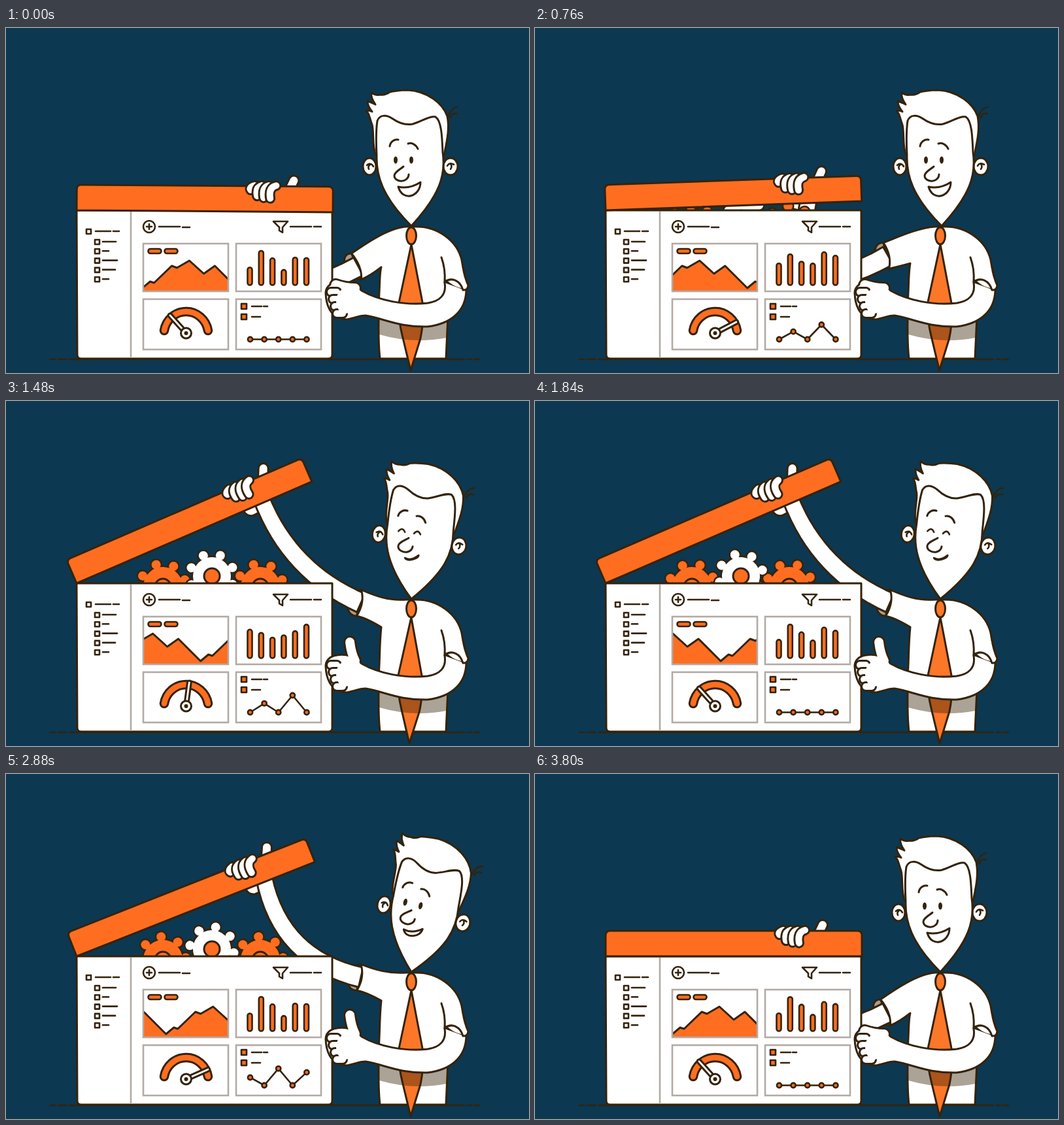
Animation of 800x528 px, one loop 3840 ms. Source, as an HTML page:

```html
<!DOCTYPE html>
<html lang="en">
<head>
<meta charset="utf-8">
<title>Opening the dashboard</title>
<style>
html, body { margin: 0; width: 100%; height: 100%; overflow: hidden; background: #0c3852; }
svg { display: block; width: 800px; height: 528px; }
.o { stroke: #34230b; stroke-width: 3; stroke-linecap: round; stroke-linejoin: round; }
.t { stroke-width: 2.6; }
.w { fill: #fff; }
.a { fill: #ff6e20; }
.tie { fill: #fd7729; }
.n { fill: none; }
.g { fill: none; stroke: #b3aaa3; stroke-width: 2.6; }
.gray { fill: #aa9c8c; }
.k { fill: #34230b; }
</style>
</head>
<body>
<svg viewBox="0 0 800 528" xmlns="http://www.w3.org/2000/svg">
  <defs><clipPath id="areaClip"><rect x="211" y="331" width="129" height="72"/></clipPath></defs>
  <rect width="800" height="528" fill="#0c3852"/>
  <path class="o n t" d="M97 507H701M68 507h7M80 507h12M706 507h6M716 507h8"/>

  <path id="cuff" class="o gray"/>
  <path id="palm" class="o w" d="M390 262C383 276 386 289 397 291C408 291 418 288 424 278L424 262Z"/>
  <path id="backArm" class="o w"/>
  <g id="gears"></g>
  <g id="lidThumb"></g>

  <path class="o w" d="M108 279H499V500Q499 506 493 506H115Q109 506 109 500Z"/>
  <path class="g" d="M191 281V505"/>
  <g id="side"></g>
  <circle class="o n t" cx="219" cy="304" r="9"/>
  <path class="o n t" d="M219 300v8M215 304h8M234 304h32M270 305h11M435 304h32M471 304h11"/>
  <path class="o w t" d="M409 296H431L423 305V313L418 310V305Z"/>

  <g clip-path="url(#areaClip)"><path id="area" class="o a"/></g>
  <g id="panels"></g>
  <rect class="o a t" x="217.5" y="338" width="20" height="7" rx="3.5"/>
  <rect class="o a t" x="242.5" y="338" width="20" height="7" rx="3.5"/>
  <g id="bars"></g>

  <g id="gauge"></g>
  <g id="needle"></g>
  <circle class="o w" cx="275.5" cy="467" r="8"/>
  <circle class="k" cx="275.5" cy="467" r="3"/>

  <rect class="o a t" x="360" y="422" width="8" height="8"/>
  <rect class="o a t" x="360" y="438" width="8" height="8"/>
  <path class="o n t" d="M376 426h15M394 426h6M376 442h13"/>
  <path id="line" class="o n t"/>
  <g id="dots"></g>

  <g id="lid">
    <path class="o a" d="M108 279V247Q108 240 115 240H493Q500 240 500 247V279Z"/>
    <g id="fingers"></g>
  </g>

  <path id="body" class="o w"/>
  <path class="o n" d="M666 351C670 362 672 375 671 389"/>
  <path id="tie" class="o tie" d="M620 331L600 425Q601 450 606 470L619 524L634 475Q639 450 638 425Z"/>
  <path id="shade" fill="#3a2408" fill-opacity=".42" d="M571 436H674V474Q622 484 571 469Z"/>
  <ellipse class="o tie" cx="620" cy="318" rx="7.5" ry="13"/>

  <g id="arm">
    <g id="thumbEdge"></g>
    <path class="o w" d="M671 390C674 408 664 418 645 421C610 425 570 417 544 402C536 392 520 386 506 389C494 391 489 398 489 406C490 430 500 445 522 446C532 444 540 440 550 440C580 445 600 458 645 457C685 452 703 430 704 402"/>
    <g id="thumbSkin"></g>
    <g id="fist"></g>
    <ellipse class="w" cx="519" cy="418" rx="14" ry="19"/>
  </g>
  <path class="o w" d="M671 389C682 380 695 387 699 401Q706 402 707 394Q701 380 699 366"/>

  <g id="head">
    <g transform="translate(556 212)"><ellipse class="o w" rx="10" ry="13"/><path class="o n t" d="M-4 -2Q2 -7 6 0M1 -3Q-3 0 -1 4"/></g>
    <path class="o n t" d="M676 138C678 129 683 122 690 121M680 137C682 131 685 130 690 131"/>
    <path id="hair" class="o w"/>
    <g transform="translate(680 212)"><ellipse class="o w" rx="11" ry="13"/><path class="o n t" d="M-5 -1Q-2 -7 5 -3M0 -4Q3 0 0 4"/></g>
    <path class="o w" d="M567 195C566 175 566 155 568 142C572 132 582 133 590 138C600 145 612 149 622 147C636 143 648 134 657 136C666 142 667 165 668 190C673 225 664 255 620 303C575 258 566 225 567 195Z"/>
    <g id="features">
      <path class="o n" d="M587 181C588 174 594 170 600 171M615 177C620 175 627 178 630 185"/>
      <g id="open"><ellipse class="k" cx="596" cy="202" rx="3" ry="5.5"/><ellipse class="k" cx="620" cy="202" rx="3" ry="5.5"/></g>
      <path id="shut" class="o n t" d="M591 204Q596 196 601 204M615 204Q620 196 625 204"/>
      <path class="o n" d="M608 212C602 217 594 221 594 226C594 233 604 236 610 233C614 231 616 227 616 224"/>
      <path id="mouth" class="o w" transform="translate(617 240)"/>
    </g>
  </g>
</svg>
<script>
const LOOP = 3840, STEP = 40, TAU = Math.PI * 2;
const el = id => document.getElementById(id);
const set = (id, name, v) => el(id).setAttribute(name, v);
const show = (id, on) => set(id, 'visibility', on ? 'visible' : 'hidden');
const clamp = x => Math.max(0, Math.min(1, x));
const ease = x => { x = clamp(x); return x * x * (3 - 2 * x); };
const ramp = (t, a, b) => ease((t - a) / (b - a));
const bump = (t, mid, wide) => Math.exp(-(((t - mid) / wide) ** 2));
const lerp = (a, b, k) => a + (b - a) * k;

// Main moments of the loop
const LIFT = 680, TOP = 1160, REST = 1480, LOOK = 2320, DROP = 2790, DOWN = 3320;

// Each bar swings around a middle height: [middle, swing, phase in degrees]
const BARS = [[358, 8.5, 0], [348, 7, 180], [357, 5, 200], [365, 8, 50], [353, 10, 100], [347, 5, 0]];
const barX = i => 373 + 17.3 * i;
const DOT_UP = [14.5, 20, 31, 38, 24];
const dotX = i => 373.5 + 21.6 * i;
const HILL = [[0, 398], [12, 388], [18, 390], [45, 364], [53, 367], [72, 356], [94, 376], [111, 364]];
const HILL_W = 145;

const edge = (d, w) => `<path class="o n" style="stroke-width:${w}" d="${d}"/>`;
const core = (d, w, color = '#fff') =>
  `<path fill="none" stroke="${color}" stroke-width="${w - 6}" stroke-linecap="round" d="${d}"/>`;
const tube = (d, w, color) => edge(d, w) + core(d, w, color);
const repeat = (n, f) => Array.from({ length: n }, (_, i) => f(i)).join('');

function gear(id, x, y, r, fill) {
  const shape = `<circle r="${r}"/>` +
    repeat(8, i => `<circle r="7" cx="${r + 5}" transform="rotate(${i * 45})"/>`);
  return `<g transform="translate(${x} ${y})"><g id="${id}"><g class="o" style="stroke-width:5">${shape}</g>` +
    `<g class="${fill}">${shape}</g></g><circle class="o a" r="12"/></g>`;
}
const item = (x, y, gap, w) => `<rect class="o w t" x="${x}" y="${y - 3}" width="7" height="7"/>` +
  `<path class="o n t" d="M${x + gap} ${y}h${w}"/>`;

function build() {
  el('gears').innerHTML = gear('gear1', 240, 284, 30, 'a') + gear('gear3', 389, 284, 30, 'a') + gear('gear2', 315, 268, 29, 'w');
  el('side').innerHTML = item(123, 311, 14, 23) + '<path class="o n t" d="M164 311h9"/>' +
    [20, 9, 22, 19, 9].map((w, i) => item(136, 327 + 14.3 * i, 12, w)).join('');
  el('panels').innerHTML = repeat(4, i => {
    const low = i >> 1;
    return `<rect class="g" x="${210 + 142 * (i % 2)}" y="${330 + 85 * low}" width="130" height="${73 + 4 * low}"/>`;
  });
  el('bars').innerHTML = repeat(6, i => `<rect id="bar${i}" class="o a t" x="${barX(i) - 3.5}" width="7" rx="3.5"/>`);
  el('dots').innerHTML = repeat(5, i => `<circle id="dot${i}" class="o a t" cx="${dotX(i)}" r="3.6"/>`);
  el('gauge').innerHTML = tube('M242 463A34 35 0 0 1 309 463', 14.5, '#ff6e20');
  el('needle').innerHTML = tube('M276 467H312', 8.8);
  el('lidThumb').innerHTML = tube('M430 252L440 231', 18);
  el('fingers').innerHTML = repeat(4, i => tube(`M${380 + 11 * i} 239Q${371 + 10 * i} 242 ${374 + 10 * i} ${259 - 13 * .3 ** i}`, 16));
  el('fist').innerHTML = repeat(4, i => tube(`M${497 + 3 * i} ${404 + 11 * i}h9`, 16));
  const thumb = 'M534 398Q528 386 526 369';
  el('thumbEdge').innerHTML = edge(thumb, 20);
  el('thumbSkin').innerHTML = core(thumb, 20);
}

// A tapered limb along a curve with one control point.
function limb(p, c, q, w0, w1) {
  const left = [], right = [];
  for (let i = 0; i <= 16; i++) {
    const s = i / 16, r = 1 - s;
    const [x, y] = [0, 1].map(k => r * r * p[k] + 2 * r * s * c[k] + s * s * q[k]);
    const [dx, dy] = [0, 1].map(k => r * (c[k] - p[k]) + s * (q[k] - c[k]));
    const h = lerp(w0, w1, s) / 2 / Math.hypot(dx, dy);
    left.push(`${x + dy * h} ${y - dx * h}`);
    right.unshift(`${x - dy * h} ${y + dx * h}`);
  }
  return 'M' + [...left, ...right].join('L') + 'Z';
}

function drawCharts(t) {
  const start = 353.5 - HILL_W * (1 + t / LOOP), pts = [];
  for (let n = -1; n < 3; n++) for (const [x, y] of HILL) pts.push(`${start + n * HILL_W + x} ${y}`);
  set('area', 'd', `M0 420L${pts.join('L')}L800 420Z`);

  BARS.forEach(([mid, swing, phase], i) => {
    const y = mid + swing * Math.cos(t / 960 * TAU - phase * TAU / 360);
    set('bar' + i, 'y', y);
    set('bar' + i, 'height', 393.5 - y);
  });

  // Odd points rise in the first half of the loop, even ones in the second.
  const half = t % 1920, odd = t < 1920 ? 1 : 0;
  const up = (1 - Math.cos(Math.PI * clamp((half - 100) / 1180))) / 2 * (1 - ramp(half, 1300, 1780));
  const ys = DOT_UP.map((h, i) => 476.5 - (i % 2 === odd ? h * up : 0));
  set('line', 'd', 'M' + ys.map((y, i) => `${dotX(i)} ${y}`).join('L'));
  ys.forEach((y, i) => set('dot' + i, 'cy', y));

  const swing = ramp(960 - Math.abs(half - 960), 77, 845);
  set('needle', 'transform', `rotate(${lerp(-132, -24, swing)} 275.5 467)`);
}

function drawLid(t, deg) {
  for (const id of ['lid', 'lidThumb', 'palm']) set(id, 'transform', `rotate(${-deg} 108 279)`);
  set('gears', 'transform', `translate(0 ${26 * clamp(1 - deg / 20)})`);
  const spin = t * 405 / LOOP;
  set('gear2', 'transform', `rotate(${43.3 - spin})`);
  for (const id of ['gear1', 'gear3']) set(id, 'transform', `rotate(${6.7 + spin})`);
}

// The sleeve follows the lid, and the arm bends when hand and sleeve come closer.
function drawReach(deg) {
  const up = Math.sqrt(Math.max(0, deg) / 23.4);
  const cx = 536 + 4 * up, cy = 365 - 56 * up, lean = 7.5 - 11 * up;
  const top = [cx - lean, cy - 20], low = [cx + lean, cy + 20];
  set('body', 'd', `M${top}C${550 + 14 * up} ${330 - 32 * up} 585 306 612 304` +
    `H628C660 304 690 325 697 355C700 375 704 385 707 396C700 404 685 398 672 386` +
    `L676 440L673 506H572C568 470 571 440 570 420C572 400 571 375 574 ${366 - 20 * up}` +
    `Q${low[0] + 14} ${low[1] + 9 * up - 6} ${low}Q${cx + 9} ${cy} ${top}Z`);
  set('cuff', 'd', `M${top}C${top[0] - 22} ${top[1]} ${low[0] - 23} ${low[1]} ${low}Z`);

  const a = deg * Math.PI / 180, c = Math.cos(a), s = Math.sin(a);
  const hand = [108 + 311 * c - 6 * s, 279 - 311 * s - 6 * c];
  const dx = cx + 3 - hand[0], dy = cy - hand[1], d = Math.hypot(dx, dy), length = 226;
  const sag = 2 * Math.sqrt(.375 * length * Math.max(0, length - d)) / d;
  const elbow = [hand[0] + dx / 2 - dy * sag, hand[1] + dy / 2 + dx * sag];
  set('backArm', 'd', limb(hand, elbow, [cx + 3, cy], 25, 31));
}

function drawFront(t, lift) {
  const tilt = 10 * bump(t, TOP, 190) + 4.7 * bump(t, LOOK, 190);
  set('tie', 'transform', `rotate(${tilt} 620 318)`);
  set('arm', 'transform', `rotate(${8 * lift} 690 400)`);
  set('shade', 'transform', `translate(0 ${-13 * lift})`);
  const thumb = ramp(t, 840, TOP) - ramp(t, DROP + 170, DOWN);
  for (const id of ['thumbEdge', 'thumbSkin']) set(id, 'transform', `rotate(${-65 * (1 - thumb)} 534 398)`);
}

// Turning the head tilts it about the chin and slides the features sideways.
function drawHead(t, lift) {
  const turn = ramp(t, 760, 1120) - .34 * (ramp(t, 1200, REST) - ramp(t, 1960, 2240)) - ramp(t, 2960, DOWN);
  set('head', 'transform', `translate(${2 * bump(t, 760, 160)} 0) rotate(${13 * turn} 620 303)`);
  set('features', 'transform', `translate(${-9 * turn} ${-turn})`);
  const tuft = 98 - 14 * lift;
  set('hair', 'd', 'M565 193C560 178 563 160 560 148C556 138 556 130 551 127C555 126 558 127 560 128' +
    'C555 122 553 118 553 112C557 113 561 115 565 117C560 110 558 104 559 99C563 102 568 103 573 102' +
    `Q580 ${tuft + 5} 587 ${tuft}C586 98 600 95 615 95C645 97 668 115 675 135C679 155 674 175 670 195`);
  const shut = t > 1000 && t < 2000;
  show('open', !shut);
  show('shut', shut);

  const calm = ramp(t, 840, 1120) - ramp(t, 2960, DOWN);
  const w = lerp(17, 10, calm) + 4 * bump(t, 2880, 200);
  const d = lerp(17, 4, calm) + 6 * bump(t, 2880, 200);
  set('mouth', 'd', `M${-w} 3Q0 7 ${w} -4C${w} ${1.3 * d - 4} ${-w * .6} ${3 + 1.4 * d} ${-w} 3Z`);
}

function draw(ms) {
  const t = Math.floor((ms % LOOP) / STEP) * STEP;
  const deg = 27.4 * ramp(t, LIFT, TOP) - 4 * ramp(t, TOP, REST) - 23.4 * ramp(t, DROP, DOWN) - .8 * bump(t, 160, 200);
  const lift = ramp(t, 840, TOP) - ramp(t, TOP, REST);
  drawCharts(t);
  drawLid(t, deg);
  drawReach(deg);
  drawFront(t, lift);
  drawHead(t, lift);
}

build();
const t0 = performance.now();
function tick() {
  draw(performance.now() - t0);
  requestAnimationFrame(tick);
}
draw(0);
requestAnimationFrame(tick);
</script>
</body>
</html>
```
